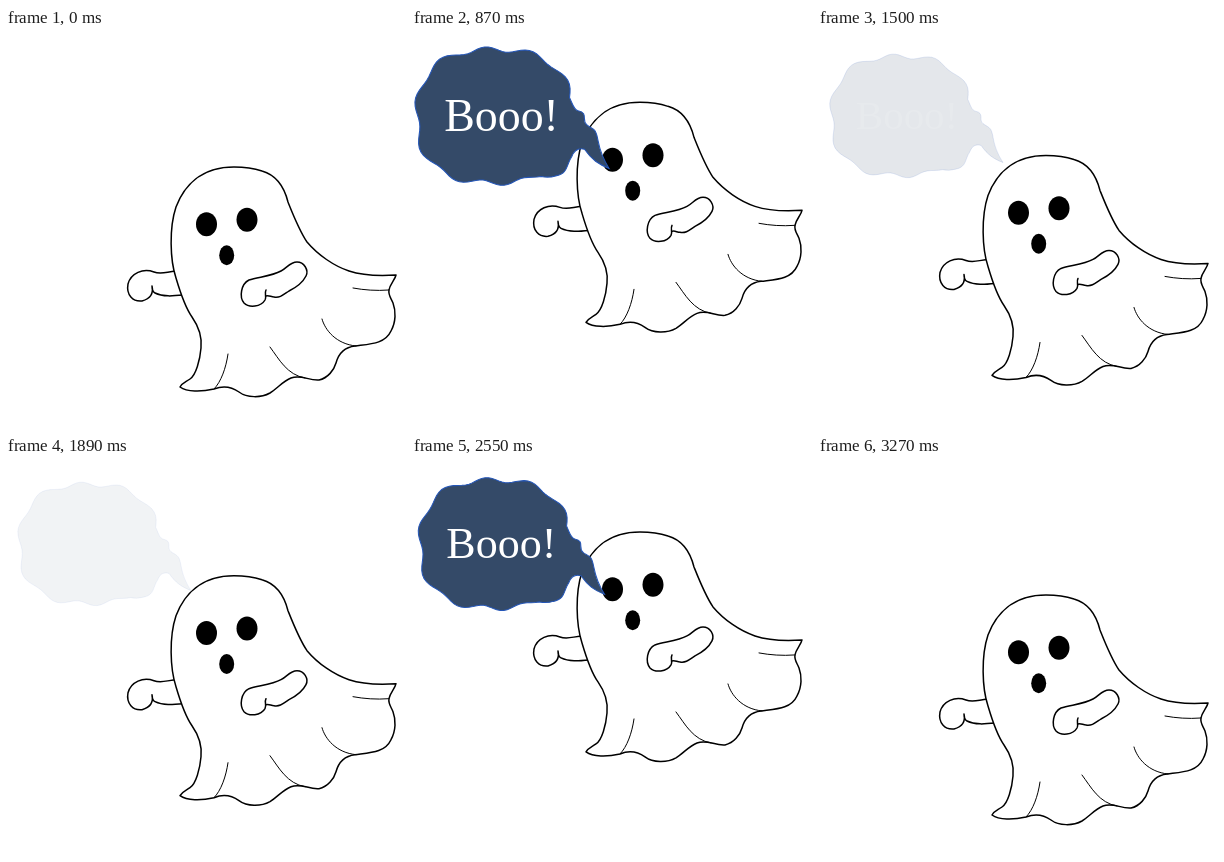
Animation of 400x400 px, one loop 3300 ms. Source, as an HTML page:

```html
<!DOCTYPE html>
<html lang="en">
<head>
<meta charset="utf-8">
<title>Booo!</title>
<style>
  html, body { margin: 0; width: 100%; height: 100%; overflow: hidden; background: #fff; }
  svg { display: block; width: 100%; height: 100%; }
  #ghost { fill: #fff; stroke: #000; stroke-width: 1.5; stroke-linejoin: round; stroke-linecap: round; }
  #ghost .dark { fill: #000; stroke: none; }
  #ghost .fold { fill: none; stroke-width: 1; }
  #shape { fill: #344a68; stroke: #2456b8; stroke-width: 1; }
  text { font: 43px "Liberation Serif", serif; fill: #fff; }
</style>
</head>
<body>
<svg viewBox="0 0 400 400">
  <g id="ghost">
    <path d="M172 243C162 243 156 247 148 244C137 240 125 245 122 256C120 267 127 274 136 273C143 271 148 267 146 258C146 262 147 264 149 265C157 269 167 268 178 267"/>
    <path d="M228 139C195 139 178 158 170 179C163 200 164 232 170 250C175 267 179 279 186 289C193 299 196 311 195 320C194 332 190 347 184 351C180 354 176 355 174 359C181 364 195 364 208 361C218 357 226 359 233 364C241 370 255 370 264 365C272 360 277 353 285 350C295 346 303 353 313 352C322 350 328 342 330 335C333 324 340 319 349 318C364 316 379 316 385 303C390 294 390 283 387 275C385 270 382 267 383 262C384 256 389 252 390 247C374 248 358 248 343 243C328 238 312 227 301 214C293 202 286 184 282 174C278 158 270 147 256 143C247 140 240 139 228 139Z"/>
    <path d="M260 262C258 266 261 268 259 272C255 279 243 280 238 275C233 269 235 256 243 252C252 249 266 248 275 243C281 240 284 234 291 234C298 234 303 242 300 248C296 256 289 260 283 263C277 267 274 270 268 269C265 269 263 267 260 268"/>
    <path class="fold" d="M222 326C220 340 215 354 208 361M264 319C273 331 281 347 299 350M316 291C319 302 330 316 350 318M347 260C358 262 370 263 383 262"/>
    <g class="dark">
      <ellipse cx="200.5" cy="196.3" rx="10.5" ry="12"/>
      <ellipse cx="241" cy="191.8" rx="10.5" ry="12"/>
      <ellipse cx="220.7" cy="227.3" rx="7.5" ry="10"/>
    </g>
  </g>
  <g id="bubble">
    <path id="shape"/>
    <text x="35.5" y="101.5">Booo!</text>
  </g>
</svg>
<script>
const STEP = 30, STEPS = 110, FLIGHT = 1637, HEIGHT = 69;
const FADE_IN = 540, SMALL = 0.945;
const $ = id => document.getElementById(id);

// One flight up and down each; bubble times count from the start of the flight
const flights = [
  { start: 0, show: 190, peak: 805, hide: 1540, fadeOut: 310, big: 1.079 },
  { start: 1661, show: 194, peak: 734, hide: 1601, fadeOut: 525, big: 1.041 }
];

const ramp = (t, from, to) => Math.max(0, Math.min(1, (t - from) / (to - from)));

// Rounded box with ten waves, closed by the tail
function bubblePath() {
  const pts = [];
  for (let deg = 52; deg <= 346; deg += 3) {
    const a = deg * Math.PI / 180, c = Math.cos(a), s = Math.sin(a);
    const edge = (Math.abs(c / 75) ** 2.5 + Math.abs(s / 65) ** 2.5) ** -0.4;
    const r = edge - 2.5 * (1 - Math.cos(10 * (deg + 97) * Math.PI / 180));
    pts.push([82.5 + r * c, 88 + r * s]);
  }
  return "M" + pts.join("L") +
    "C156 77 157 82 161 83C171 85 164 92 169 96C171 98 175 99 177 102" +
    "C181 109 178 118 190 137C180 133 174 129 167 119C160 117 157 121 155 126" +
    "C150 133 152 142 140 144Q133 146 " + pts[0] + "Z";
}

function draw(now) {
  // The last step of the loop repeats the first
  const t = Math.floor(now / STEP) % STEPS % (STEPS - 1) * STEP;
  const f = flights[t < flights[1].start ? 0 : 1], p = t - f.start;

  const up = Math.max(0, 1 - Math.abs(2 * p / FLIGHT - 1));
  $("ghost").setAttribute("transform", `translate(0 ${-HEIGHT * up})`);

  const grown = Math.min(ramp(p, f.show, f.peak), ramp(p, f.hide, f.peak));
  const scale = SMALL + (f.big - SMALL) * grown;
  $("bubble").setAttribute("transform", `translate(85 86) scale(${scale}) translate(-85 -86)`);

  // Fill, line and text each fade on their own
  const alpha = Math.min(ramp(p, f.show, f.show + FADE_IN), ramp(p, f.hide, f.hide - f.fadeOut));
  for (const el of $("bubble").children) {
    el.setAttribute("fill-opacity", alpha);
    el.setAttribute("stroke-opacity", alpha);
  }
}

$("shape").setAttribute("d", bubblePath());
const start = performance.now();
function tick() {
  draw(performance.now() - start);
  requestAnimationFrame(tick);
}
tick();
</script>
</body>
</html>
```
